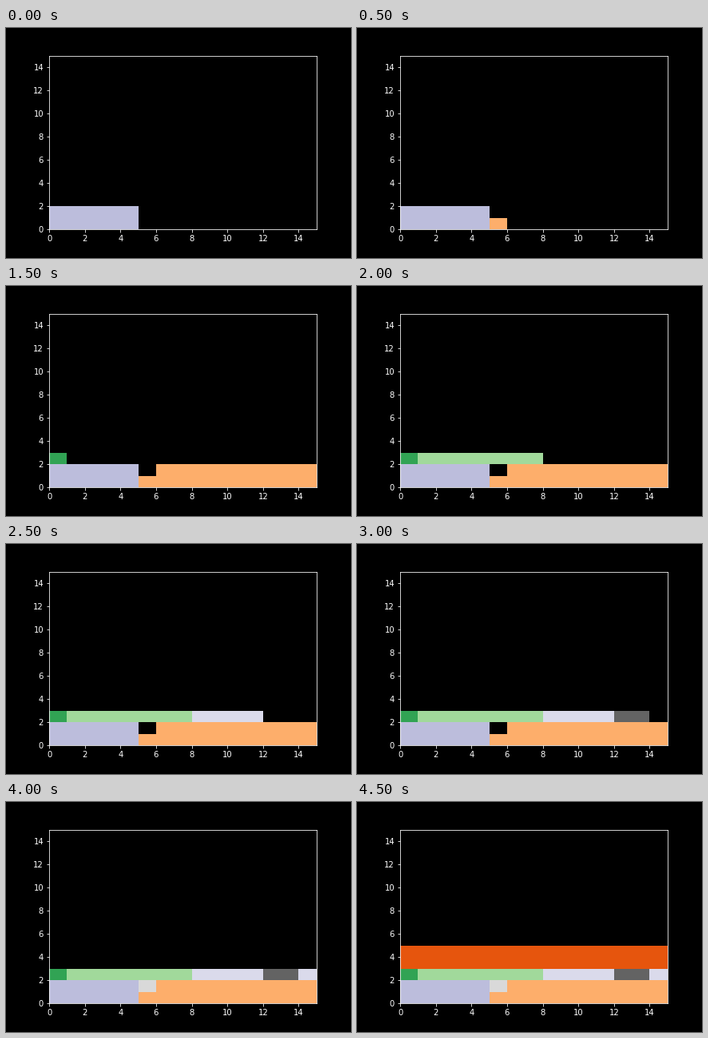
These frames come from a looping animation (432x288 px, 5000 ms). A matplotlib script:

```python
import matplotlib.pyplot as plt
from matplotlib.animation import FuncAnimation
from matplotlib.patches import Rectangle

SIZE = 15
STEP_MS = 500
SHAPES = "5x2 1x1 9x2 1x1 7x1 4x1 2x1 1x1 1x1 15x2"
SHADES = [14, 6, 6, 8, 10, 15, 16, 19, 15, 4]


def pack(shapes):
    """Fill shelves from the left; a gap is used once the shelf has no more room than it."""
    x = y = shelf = 0
    gaps = []
    for w, h in shapes:
        if x == SIZE:
            x, y, shelf = 0, y + shelf, 0
        if gaps and gaps[0][2] >= SIZE - x:
            gap_x, gap_y, _ = gaps.pop(0)
            yield (gap_x, gap_y), w, h
            continue
        yield (x, y), w, h
        shelf = max(shelf, h)
        if h < shelf:
            gaps.append((x, y + h, w))
        x += w


plt.style.use("dark_background")
plt.rcParams["font.family"] = "DejaVu Sans"

fig, ax = plt.subplots(figsize=(6, 4), dpi=72)
fig.subplots_adjust(left=0.125, right=0.9, bottom=0.125, top=0.88)
ax.set(xlim=(0, SIZE), ylim=(0, SIZE),
       xticks=range(0, SIZE, 2), yticks=range(0, SIZE, 2))

palette = plt.get_cmap("tab20c")
shapes = [tuple(map(int, s.split("x"))) for s in SHAPES.split()]
blocks = [
    ax.add_patch(Rectangle(corner, w, h, facecolor=palette(shade)))
    for (corner, w, h), shade in zip(pack(shapes), SHADES)
]


def update(step):
    for i, block in enumerate(blocks):
        block.set_visible(i <= step)
    return blocks


anim = FuncAnimation(
    fig,
    update,
    frames=len(blocks),
    init_func=lambda: update(0),
    interval=STEP_MS,
    repeat=True,
    repeat_delay=0,
    blit=False,
)

plt.show()
```
